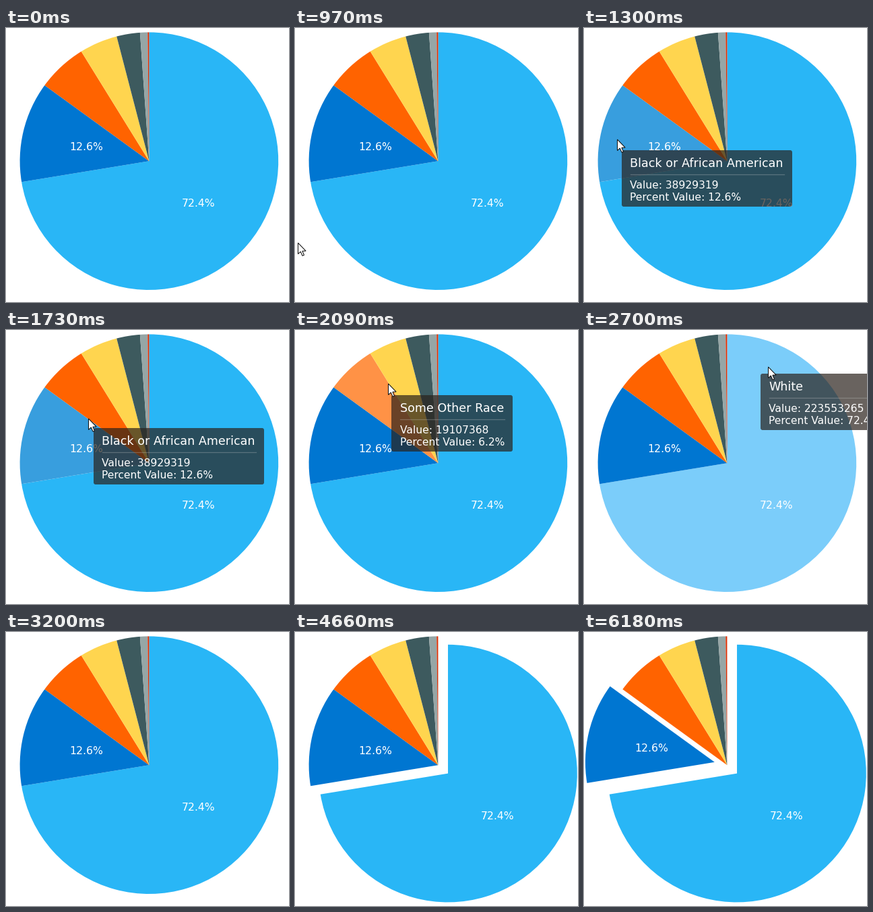
Recreate the animation shown at these times as a matplotlib script. Size 420 by 408 pixels, loop 8030 ms.

```python
import math

import numpy as np
import matplotlib.pyplot as plt
from matplotlib.animation import FuncAnimation
from matplotlib.patches import FancyBboxPatch, Polygon, Wedge

W, H, DPI = 420, 408, 100
STEP, FRAMES = 22, 365
CX, CY, R = 212.4, 198.2, 191.8

# name, value, colour, hovered colour
SLICES = [
    ("White", 223553265, "#29b6f6", "#7bcdfa"),
    ("Black or African American", 38929319, "#0076d1", "#389ede"),
    ("Some Other Race", 19107368, "#ff6300", "#ff9246"),
    ("Asian", 14674252, "#ffd54f", "#ffe184"),
    ("Two or More Races", 9009073, "#3d5a5e", "#778b8e"),
    ("American Indian and Alaska Native", 2932248, "#96a6a6", "#b6c1c1"),
    ("Native Hawaiian and Other Pacific Islander", 540013, "#dd2c00", "#e76b4d"),
]
VALUES = np.array([s[1] for s in SLICES])
SHARE = VALUES / VALUES.sum()
ENDS = np.cumsum(SHARE) * 360
STARTS = ENDS - SHARE * 360
EXPLODE_AT = {0: 4660, 1: 6180}

# the pointer moves in even ticks; knots are (tick, position, velocity per tick)
ENTER, LEAVE, TICKS = 920, 3200, 49
KNOTS = [
    (0, (2, 362), (2, -45)),
    (8, (50, 166), (3, -3.7)),
    (16, (120, 136), (4, -4)),
    (25, (139, 80), (7, -7)),
    (38, (274, 55), (24, 0)),
    (49, (430, 150), (8, 12)),
]
ARROW = np.array([(0, 0), (0, 16.5), (3.8, 13), (6.5, 19.2), (9, 18.1),
                  (6.4, 12.2), (11.6, 12)])

fig = plt.figure(figsize=(W / DPI, H / DPI), dpi=DPI, facecolor="white")
ax = fig.add_axes([0, 0, 1, 1])
ax.set_xlim(0, W)
ax.set_ylim(H, 0)
ax.axis("off")


def px_text(size, **kw):
    return ax.text(0, 0, "", fontsize=size * 72 / DPI, color="white",
                   family="DejaVu Sans", va="baseline", **kw)


def percent(i):
    return f"{SHARE[i] * 100:.1f}%"


def tip_lines(i):
    return SLICES[i][0], f"Value: {VALUES[i]}", f"Percent Value: {percent(i)}"


def along(i, dist):
    """Point at a distance from the centre on the middle line of a slice."""
    mid = math.radians((STARTS[i] + ENDS[i]) / 2 - 90)
    return CX + dist * math.cos(mid), CY + dist * math.sin(mid)


wedges = [
    ax.add_patch(Wedge((CX, CY), R, a - 90, b - 90, fc=s[2], lw=0))
    for s, a, b in zip(SLICES, STARTS, ENDS)
]
labels = {i: px_text(15.6, ha="center", zorder=2) for i in EXPLODE_AT}
for i, label in labels.items():
    label.set_text(percent(i))

box = ax.add_patch(FancyBboxPatch(
    (0, 0), 10, 84, boxstyle="round,pad=0,rounding_size=3",
    fc="#2a211b", alpha=0.7, lw=0, zorder=3))
rule, = ax.plot([], [], color="#cecece", alpha=0.3, lw=0.9, zorder=4)
lines = [px_text(size, zorder=4) for size in (17.5, 15.5, 15.5)]
DROPS = (25, 57, 75)
arrow = ax.add_patch(Polygon(ARROW, closed=True, fc="white", ec="#111111",
                             lw=0.75, zorder=5))
tip_parts = [box, rule, *lines]


def tip_width(i):
    renderer = fig.canvas.get_renderer()
    widths = []
    for line, s in zip(lines, tip_lines(i)):
        line.set_text(s)
        widths.append(line.get_window_extent(renderer).width)
    return round(max(widths))


WIDTHS = [tip_width(i) for i in range(len(SLICES))]


def pointer(tick):
    """Cubic Hermite curve through the knots."""
    for (a, p, u), (b, q, v) in zip(KNOTS, KNOTS[1:]):
        if tick <= b:
            break
    p, u, q, v = map(np.array, (p, u, q, v))
    span = b - a
    s = (tick - a) / span
    ease = s * s * (3 - 2 * s)
    return (p + (q - p) * ease
            + span * s * (1 - s) * (u * (1 - s) - v * s))


def slice_at(p):
    dx, dy = p[0] - CX, p[1] - CY
    if math.hypot(dx, dy) > R:
        return None
    turn = (math.degrees(math.atan2(dy, dx)) + 90) % 360
    return min(int(np.searchsorted(ENDS, turn)), len(SLICES) - 1)


def show_tip(i, x, y):
    box.set_bounds(x, y, WIDTHS[i] + 25, 84)
    rule.set_data([x + 13, x + 13 + WIDTHS[i]], [y + 36, y + 36])
    for line, s, drop in zip(lines, tip_lines(i), DROPS):
        line.set_text(s)
        line.set_position((x + 12.5, y + drop))


def draw(n):
    t = n * STEP + STEP - 2
    moving = ENTER <= t < LEAVE

    # the tooltip trails the pointer by one tick
    hovered = None
    if moving:
        tick = int((t - ENTER) * TICKS / (LEAVE - ENTER))
        arrow.set_xy(ARROW + np.round(pointer(tick)) - (0.5, 0))
        behind = pointer(max(tick - 1, 0))
        hovered = slice_at(behind)
        if hovered is not None:
            show_tip(hovered, *np.round(behind + 10))
    arrow.set_visible(moving)
    for part in tip_parts:
        part.set_visible(hovered is not None)

    for i, wedge in enumerate(wedges):
        wedge.set_facecolor(SLICES[i][3 if i == hovered else 2])
    for i, start in EXPLODE_AT.items():
        shift = 0.1 * R if t >= start else 0
        wedges[i].set_center(along(i, shift))
        x, y = along(i, shift + R / 2)
        labels[i].set_position((x, y + 6))
    return [*wedges, *labels.values(), *tip_parts, arrow]


anim = FuncAnimation(fig, draw, frames=FRAMES, interval=STEP, repeat=True)
plt.show()
```
